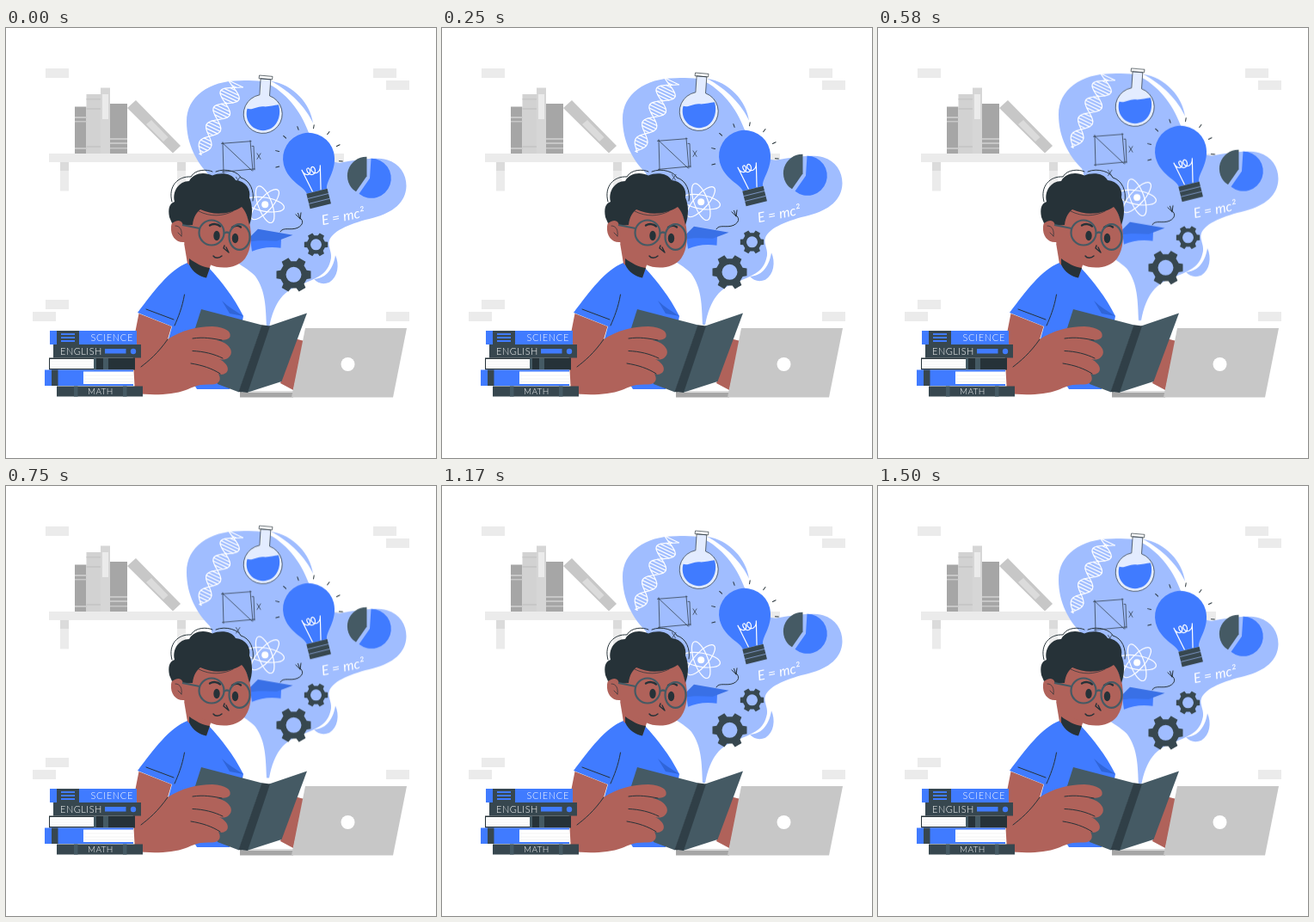
Animation of 500 by 500 pixels, one loop 1540 ms. Source, as an HTML page:

```html
<!DOCTYPE html>
<html lang="en">
<head>
<meta charset="utf-8">
<title>Student reading</title>
<style>
  html, body { margin: 0; width: 100%; height: 100%; overflow: hidden; background: #fff; }
  svg { display: block; width: 100%; height: 100%; }
  text { font-family: Lato, sans-serif; font-weight: 300; fill: #fff; }
  .thought { animation: float 770ms cubic-bezier(.364, 0, .636, 1) -60ms infinite alternate; }
  @keyframes float { to { transform: translateY(-9px); } }
  .blue { fill: #407bff; }
  .ink { fill: #263238; }
  .slate { fill: #455a64; }
  .steel { fill: #37474f; }
  .skin { fill: #b0625a; }
  .pale { fill: #ebebeb; }
  .cloud { fill: #a0bdff; }
  .line { fill: none; stroke: #263238; stroke-width: 1; stroke-linecap: round; stroke-linejoin: round; }
  .chalk { fill: none; stroke: #fff; stroke-width: 1.2; stroke-linecap: round; stroke-linejoin: round; }
  .thin { stroke-width: .7; }
  .bold { stroke-width: 2.4; }
</style>
</head>
<body>
<svg viewBox="0 0 500 500">
  <!-- wall and shelf -->
  <path class="pale" d="M46 47h27v11h-27zM427 47h27v11h-27zM442 61h27v11h-27zM46 316h27v11h-27zM31 330h27v11h-27zM442 330h27v11h-27z
    M50 146h343v10h-343zM63 156h10v33.500h-10zM199 156h10v33.500h-10z"/>
  <path fill="#dbdbdb" d="M63 156h10v10h-10zM199 156h10v10h-10z"/>
  <path fill="#a6a6a6" d="M80 91.500h13.500v54.500h-13.500zM121 88h20v58h-20z"/>
  <path fill="#d2d2d2" d="M93.500 77h17v69h-17z"/>
  <path fill="#d6d6d6" d="M110 69.500h11v76.500h-11z"/>
  <path class="pale" d="M112 77h7v29h-7z"/>
  <path fill="#c7c7c7" d="M80 103h13.500v2h-13.500zM80 108h13.500v1.500h-13.500zM93.500 82h16.500v1.500h-16.500zM93.500 93h16.500v2h-16.500zM93.500 137h16.500v2h-16.500zM80 139h13.500v2h-13.500zM121 128h20v2h-20zM121 133h20v2h-20zM121 139h20v1.500h-20z
    M151 84L203 137L194 145.500L141 93z"/>
  <path fill="#dbdbdb" d="M169 107L188.500 127L183 132L163 112z"/>

  <!-- thought cloud -->
  <g class="thought">
    <path class="cloud" d="M303 348.500C302 325 302 306 290 289C280 277 255 270 245 245C235 215 245 190 237 172C222 157 210 136 210 109C210 80 236 61.500 272 61.500C284 61 295 61 303 64C325 75 342 95 352 122C356 140 368 155 388 157C410 153 430 150 443 153.500C458 158 465.500 170 465.500 184C465 203 450 215 427 221C402 227 381 235 376 247C373 254 381 262 377 272C373 288 358 292 345 298C323 305 312 318 306 348.500z"/>
    <path class="cloud" d="M308 62C334 66 354 88 357 111C349 93 331 74 308 62zM383 264.500C388 275 386 290 376 296C369 299 362 297 358 292C370 292 380 283 383 264.500z"/>

    <path id="dna" class="chalk"/>
    <path id="rungs" class="chalk"/>

    <!-- flask -->
    <path fill="#e3ecff" d="M296.500 59L307.800 60L306.500 79A22.500 22.500 0 1 1 294.500 78z"/>
    <path class="blue" d="M280.500 94C287 96 292 91 299 91.500C306 92 311 90 317 89.500C320 100 317 111 309 116.500C300 122 288 119 283 111C279.500 106 279 99 280.500 94z"/>
    <path class="line thin" d="M296.500 59L307.800 60L306.500 79A22.500 22.500 0 1 1 294.500 78zM295 55.200L310 56.500L309.500 60L294.500 58.800z"/>

    <!-- square sketch -->
    <path class="line thin" d="M250.500 134.500L285 131.800M252 133L253 168.500M251.500 167.500L289 164M284 131L287 166M286 137.500L288 137.500L289 165M252 134L286 166"/>
    <path class="line thin" d="M292 146L296 152.500M296 146L292 152.500M267.500 173.500L271.500 180M272 173.500L267.500 180"/>

    <!-- atom -->
    <g transform="translate(301.200 205.300)">
      <g class="chalk">
        <ellipse rx="22.500" ry="8" transform="rotate(10)"/>
        <ellipse rx="22.500" ry="8" transform="rotate(70)"/>
        <ellipse rx="22.500" ry="8" transform="rotate(132)"/>
      </g>
      <circle r="4" fill="#fff"/>
    </g>

    <!-- bulb -->
    <g transform="translate(352 152) rotate(-14)">
      <path class="blue" d="M-12 39C-13 30 -29.500 21 -30 0A30 30 0 0 1 30 0C29.500 21 13 30 12 39z"/>
      <path class="chalk" d="M-5 38L-11 11C-10 17 -4 21 -2 15C-1 9 -7 9 -5 15C-3 21 4 20 4 14C4 8 -2 10 0 15C3 21 10 18 11 11L5 38"/>
      <path class="steel" d="M-12.500 39h25v18h-25z"/>
      <path d="M-12.500 45h25M-12.500 51h25" stroke="#a0bdff" stroke-width=".6"/>
      <path id="rays" class="line"/>
    </g>

    <!-- pie chart -->
    <path class="blue" d="M424.500 152A23 23 0 1 1 410.500 193L423 175z"/>
    <path class="slate" d="M419.500 150A22 22 0 0 0 407 190.500L419.500 172.500z"/>

    <text transform="translate(368 229.500) rotate(-11)" font-size="16" font-style="italic" style="font-weight:400">E = mc²</text>

    <!-- graduation cap -->
    <path class="blue" d="M284 246L320 245L319.500 256C306 254 296 256 286 260z"/>
    <path fill="#3970e6" d="M278 249L293 234L333.500 241L315 248C302 247 290 247 278 249z"/>
    <path class="line" d="M319 237C322 231 331 236 339 232.500C346 229 346 224 342 221M342 222L337 217M342 222L339.500 215.500M342 222L343 215"/>

    <path id="gears" class="steel" fill-rule="evenodd"/>
  </g>

  <!-- laptop -->
  <path fill="#a6a6a6" d="M272 423h62v6.500h-62z"/>
  <path fill="#dbdbdb" d="M274 422h60v2h-60z"/>
  <path class="skin" d="M335 361L347 364L334 421L319 413z"/>
  <path fill="#c7c7c7" d="M348 349H466L450 429.500H332z"/>
  <circle cx="397.500" cy="391" r="8" fill="#fff"/>

  <!-- neck and shirt -->
  <path class="blue" d="M211 273C190 281 172 306 153 331L193 347L188 365L222 420H260L276 335C265 313 250 294 236 279z"/>
  <path class="skin" d="M207 250L240 270L233 290L211 274z"/>
  <path class="ink" d="M213 268C221 274 229 278 237 279L233 290.500C225 289 217 284 213 275z"/>
  <path fill="#3065d8" d="M251 317C258 324 267 329 276 335L260 332z"/>
  <path class="line" d="M163 327L195 339M207.500 310C205 325 200 337 196 346"/>

  <!-- open book -->
  <path class="slate" d="M227 327L298 345.500L271 423.500L246 414L219 352z"/>
  <path class="slate" d="M306 346.500L350 331.500L320.500 411L280 424z"/>
  <path class="ink" style="fill:#303f47" d="M297.500 345.300L307 346.500L281 424L270.500 423z"/>

  <!-- arm -->
  <path class="skin" d="M154.500 332L192.500 347L188 362C203 352 222 347 240 347C256 348 262 353 260.500 359C259 363 252 363 245 363C260 366 266 377 259 383C256 386 251 386 248 385C260 391 260 400 254 402C250 404 249 402 247 402C251 409 248 415 238 414.500C222 414 217 418 209 421C193 427 170 427 150 425L147 370z"/>
  <path class="line" d="M217 361C230 359 240 361 251 363M217 375.500C230 376 242 379 252 384M215 390C228 392 240 396 249 402M157 394C166 387 176 379 188 362"/>

  <!-- head -->
  <path class="skin" d="M204 216L220 203H275L283 226C286 240 286 257 278 268C269 280 249 281 237 275C222 268 212 259 207 249C198 250 191 242 192 231C193 222 200 220 204 224z"/>
  <path class="ink" d="M190 220C188 210 190 204 196 202C193 190 201 178 213 178C218 168 231 167 240 171.500C250 167 263 169 267 177C279 178 285 188 283 197C287 206 287 219 283 229C281 220 279 213 274 208C262 216 243 219 226 211C222 214 218 219 217 229L206 230C205 223 200 222 193 227z"/>
  <path class="line" d="M193 202C188 184 200 172 215 173C220 164 234 164 240 167M244 167C256 162 271 168 273 174C284 177 289 190 287 201"/>
  <path class="line thin" d="M224 213C238 220 252 219 264 213M197 230C203 230 205 236 204 242M200 238L204 242"/>
  <g class="ink">
    <ellipse cx="245" cy="241.500" rx="3.700" ry="5.800"/>
    <ellipse cx="266.500" cy="244.500" rx="3.700" ry="5.800"/>
  </g>
  <path class="line bold" d="M237 229.500C241 227 246 228 249 230.500M263 232C266 229.500 270 229.500 273 231.500"/>
  <path class="line" style="stroke-width:1.400" d="M254 253L253 256L259 261L256 255M241 265C243 268 248 268 251 265"/>
  <g fill="none" stroke="#455a64" stroke-width="2.200">
    <circle cx="239" cy="238" r="14.500"/>
    <ellipse cx="271.500" cy="243" rx="12" ry="14.800"/>
    <path d="M253.500 239Q257 236 260 239M205 229L225 233"/>
  </g>

  <!-- book stack -->
  <path class="blue" d="M51 352h101v16h-101z"/>
  <path class="steel" d="M59 352h26v16h-26z"/>
  <path class="blue" d="M64 355h16v2h-16zM64 359h16v2h-16zM64 363h16v2h-16z"/>
  <text x="98.500" y="364" font-size="11" letter-spacing=".7">SCIENCE</text>

  <path class="steel" d="M55 368h102v15.500h-102z"/>
  <path class="blue" d="M115 373h24.500v5.500h-24.500z"/>
  <circle class="blue" cx="148" cy="376" r="3.200"/>
  <text x="63" y="379.500" font-size="11" letter-spacing=".5">ENGLISH</text>

  <path class="ink" d="M50 383.500h100v14h-100z"/>
  <path fill="#fff" d="M51 385h51v11h-51z"/>
  <path d="M53 388h48M53 391h48M53 394h48" stroke="#ebebeb" stroke-width=".6"/>
  <path class="slate" d="M102 384h3v13h-3zM113 384h6v13h-6z"/>

  <path class="blue" d="M45 397.500h103v18.500h-103z"/>
  <path class="steel" d="M53 397.500h7.500v18.500h-7.500z"/>
  <path fill="#fff" d="M90 399.500h58v14.500h-58z"/>
  <path d="M91 404h57M91 408h57M91 411.500h57" stroke="#ebebeb" stroke-width=".6"/>

  <path class="steel" d="M59 416.500h100v12h-100z"/>
  <path class="slate" d="M79 416.500h4.500v12h-4.500zM136 416.500h4.500v12h-4.500z"/>
  <text x="95" y="426" font-size="10" letter-spacing=".3">MATH</text>
</svg>
<script>
  const setPath = (id, d) => document.getElementById(id).setAttribute('d', d);
  const fix = n => n.toFixed(2);
  const polar = (x, y, r, a) => `${fix(x + r * Math.cos(a))} ${fix(y + r * Math.sin(a))}`;

  // Point on one strand of the helix, swinging about a curved axis.
  function helix(t, side) {
    const u = 1 - t;
    const x = u * u * 267 + 2 * u * t * 247 + t * t * 226;
    const y = u * u * 65 + 2 * u * t * 104 + t * t * 147;
    const swing = side * (13 - 6.5 * t) * Math.sin(Math.PI * (1 + 4.3 * (t - 0.29)));
    return `${fix(x + swing * 0.9)} ${fix(y + swing * 0.43)}`;
  }

  const strand = side =>
    'M' + Array.from({ length: 81 }, (_, i) => helix(i / 80, side)).join('L');
  setPath('dna', strand(1) + strand(-1));
  setPath('rungs', Array.from({ length: 26 }, (_, i) =>
    `M${helix(i / 25, 1)}L${helix(i / 25, -1)}`).join(''));

  const tilt = 14;
  setPath('rays', Array.from({ length: 8 }, (_, i) => {
    const a = (165 + 28.5 * i + tilt) * Math.PI / 180;
    return `M${polar(0, 0, 35.5, a)}L${polar(0, 0, 39.5, a)}`;
  }).join(''));

  function gear(x, y, r, hole) {
    const teeth = 6, step = 2 * Math.PI / teeth, points = [];
    for (let i = 0; i < teeth; i++) {
      const a = i * step;
      points.push(polar(x, y, r * 0.78, a - step * 0.31), polar(x, y, r, a - step * 0.21),
        polar(x, y, r, a + step * 0.21), polar(x, y, r * 0.78, a + step * 0.31));
    }
    return `M${points.join('L')}zM${x - hole} ${y}a${hole} ${hole} 0 1 0 ${2 * hole} 0a${hole} ${hole} 0 1 0 ${-2 * hole} 0z`;
  }
  setPath('gears', gear(334.5, 287, 20.5, 9) + gear(360.5, 252, 14, 6.5));
</script>
</body>
</html>
```
